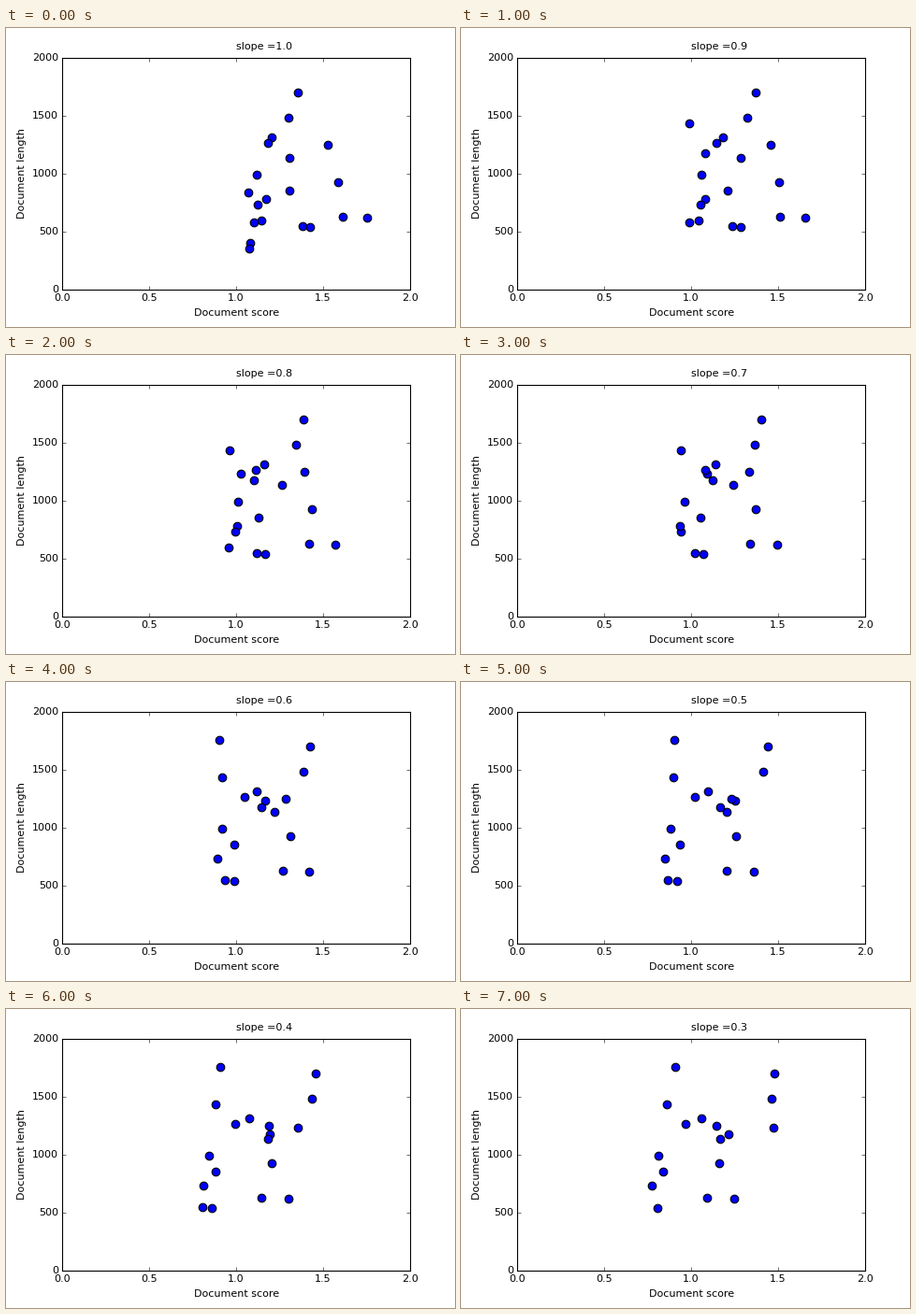
A matplotlib script for the animation above (8 s loop, 480x320 px).

```python
import numpy as np
import matplotlib.pyplot as plt
from matplotlib.animation import FuncAnimation

plt.style.use("classic")
plt.rcParams.update({
    "font.family": "DejaVu Sans",
    "font.size": 10,
    "figure.facecolor": "white",
})

STEPS = 8
TOP = 20

# Plotted data: length, score at slope 1.0, score at slope 0.3.
# The last three are longer than the axis but still take a rank.
DOCS = np.array([
    (1699, 1.354, 1.478), (1481, 1.300, 1.462), (1311, 1.204, 1.059),
    (1263, 1.183, 0.968), (1247, 1.527, 1.145), (1134, 1.306, 1.167),
    (989, 1.118, 0.812), (924, 1.585, 1.159), (852, 1.306, 0.839),
    (836, 1.070, 0.580), (779, 1.172, 0.737), (731, 1.124, 0.774),
    (626, 1.613, 1.091), (618, 1.754, 1.245), (594, 1.145, 0.678),
    (578, 1.102, 0.612), (545, 1.384, 0.754), (537, 1.425, 0.806),
    (400, 1.081, 0.580), (352, 1.075, 0.580), (1432, 1.014, 0.860),
    (1174, 1.060, 1.217), (1231, 0.916, 1.473), (1755, 0.890, 0.909),
    (2300, 1.030, 1.500), (2400, 0.850, 1.200), (2500, 0.600, 0.850),
])


def top_points(step):
    """Best documents; the score's divisor is linear in the slope."""
    length, first, last = DOCS.T
    t = step / (STEPS - 1)
    score = 1 / ((1 - t) / first + t / last)
    best = np.argsort(-score)[:TOP]
    return np.column_stack([score, length])[best]


fig, ax = plt.subplots(figsize=(6, 4), dpi=80)
fig.subplots_adjust(left=0.125, right=0.9, bottom=0.125, top=0.9)
ax.set_xlim(0, 2)
ax.set_ylim(0, 2000)
ax.set_xticks(np.arange(0, 2.1, 0.5))
ax.set_yticks(range(0, 2001, 500))
ax.tick_params(axis="y", pad=3.6)
ax.set_xlabel("Document score", x=0.5015)
ax.set_ylabel("Document length", y=0.502)

dots = ax.scatter([], [], s=60, c="blue", edgecolors="black", linewidths=1)
title = ax.text(0.5, 1.05, "", transform=ax.transAxes, va="center")


def update(step):
    dots.set_offsets(top_points(step))
    title.set_text(f"slope ={1 - step / 10:.1f}")
    return dots, title


anim = FuncAnimation(fig, update, frames=STEPS, interval=1000,
                     init_func=lambda: update(0), repeat=True, repeat_delay=0)
plt.show()
```
